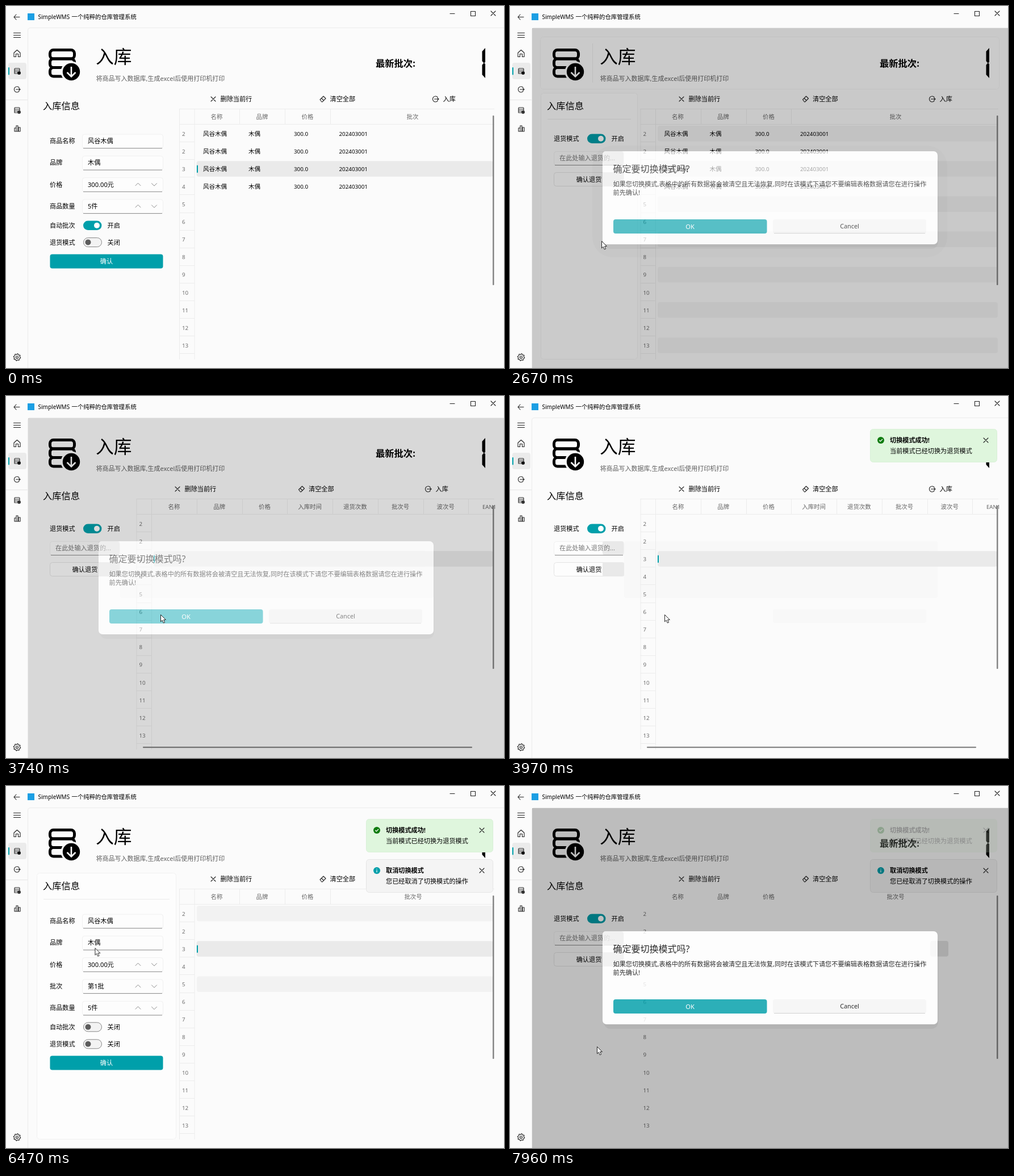
Animation of 877 by 638 pixels, one loop 8000 ms. Source, as an HTML page:

```html
<!DOCTYPE html>
<html lang="zh-CN">
<head>
<meta charset="utf-8">
<title>SimpleWMS</title>
<style>
html, body { margin: 0; width: 100%; height: 100%; overflow: hidden; background: #fbfbfb; }
svg { display: block; width: 877px; height: 638px; font-family: 'Noto Sans', 'Noto Sans CJK SC', 'Noto Sans CJK', sans-serif; }
.ic { fill: none; stroke: #222; stroke-width: 1.1; stroke-linecap: round; stroke-linejoin: round; }
.spin { stroke: #8c8c8c; stroke-width: 1; }
.entry, .entry2, .switching, .back, .again, .hover, .row1, .row5, .ghost { animation: 8s step-end infinite; }
.entry { animation-name: entry; }
.entry2 { animation-name: entry2; }
.switching { animation-name: switching; }
.back { animation-name: back; }
.again { animation-name: again; }
.hover { animation-name: hover; }
.row1 { animation-name: row1; }
.row5 { animation-name: row5; }
.ghost { animation-name: ghost; }
.ok { fill: #009faa; animation: ok 8s step-end infinite; }
.tip1 { animation: tip1 8s linear infinite; }
.tip2 { animation: tip2 8s linear infinite; }
.toast1 { animation: toast1 8s linear infinite; }
.toast2 { animation: toast2 8s linear infinite; }
.dialog { animation: dialog 8s linear infinite; }
.cursor { animation: cursor 8s linear infinite; }
@keyframes entry { 0% { opacity: 1 } 31.5%, 100% { opacity: 0 } }
@keyframes switching { 0% { opacity: 0 } 31.5% { opacity: 1 } 46.5%, 100% { opacity: 0 } }
@keyframes back { 0% { opacity: 0 } 46.5% { opacity: 1 } 77.5%, 100% { opacity: 0 } }
@keyframes entry2 { 0% { opacity: 0 } 77.5% { opacity: 1 } 96.5%, 100% { opacity: 0 } }
@keyframes again { 0% { opacity: 0 } 96.5%, 100% { opacity: 1 } }
@keyframes hover { 0% { opacity: 0 } 18.5%, 100% { opacity: 1 } }
@keyframes row5 { 0% { opacity: 0 } 56.5%, 100% { opacity: 1 } }
@keyframes row1 { 0% { opacity: 0 } 61.5%, 100% { opacity: 1 } }
@keyframes ghost { 0% { opacity: 1 } 56%, 100% { opacity: 0 } }
@keyframes ok { 0% { fill: #009faa } 39.5% { fill: #00a7b3 } 50%, 100% { fill: #009faa } }
@keyframes tip1 { 0%, 22.2% { opacity: 0 } 24%, 100% { opacity: 1 } }
@keyframes tip2 { 0%, 91.5% { opacity: 0 } 93.4%, 100% { opacity: 1 } }
@keyframes toast1 {
  0% { transform: translateX(245px) }
  47% { transform: translateX(245px); animation-timing-function: ease-out }
  49.6% { transform: none }
  97.5% { transform: none; opacity: 1 }
  100% { transform: none; opacity: .09 }
}
@keyframes toast2 {
  0% { transform: translateX(245px) }
  77.6% { transform: translateX(245px); animation-timing-function: ease-out }
  80.2%, 100% { transform: none }
}
@keyframes dialog {
  0%, 31.5% { opacity: 0 }
  34.375%, 45.9% { opacity: 1 }
  47.5%, 96.6% { opacity: 0 }
  99.5%, 100% { opacity: .83 }
}
@keyframes cursor {
  0%, 16.24% { transform: translate(405px, 640px) }
  16.25% { transform: translate(405px, 612px) }
  18% { transform: translate(330px, 535px) }
  20% { transform: translate(210px, 440px) }
  21.5%, 37.375% { transform: translate(161px, 414px) }
  38% { transform: translate(178px, 412px) }
  38.7% { transform: translate(196px, 409px) }
  39.4% { transform: translate(216px, 404px) }
  40.25%, 40.8% { transform: translate(251px, 387px) }
  42% { transform: translate(266px, 385px) }
  43.875%, 54.5% { transform: translate(272px, 385px) }
  56.5% { transform: translate(262px, 350px) }
  59% { transform: translate(300px, 280px) }
  61.5% { transform: translate(380px, 205px) }
  64.5%, 64.875% { transform: translate(440px, 171px) }
  66.5% { transform: translate(540px, 178px) }
  68.375%, 68.9% { transform: translate(622px, 206px) }
  70% { transform: translate(700px, 240px) }
  71.5% { transform: translate(560px, 298px) }
  73% { transform: translate(300px, 285px) }
  74.875%, 75.5% { transform: translate(120px, 240px) }
  76.5%, 78.5% { transform: translate(152px, 234px) }
  85.5%, 86.125% { transform: translate(165px, 384px) }
  88.5% { transform: translate(160px, 430px) }
  90.5%, 100% { transform: translate(153px, 459px) }
}
</style>
</head>
<body>
<svg id="stage" viewBox="0 0 877 638"></svg>
<script>
const TEAL = '#009faa', LINE = '#ececec', SIZE = 11.15;

// Text is placed by its vertical centre.
const text = (x, cy, str, { size = SIZE, fill = '#000', weight = 400, mid = false } = {}) =>
  `<text x="${x}" y="${cy + size * .37}" font-size="${size}" fill="${fill}" font-weight="${weight}"${mid ? ' text-anchor="middle"' : ''}>${str}</text>`;
const rect = (x, y, w, h, r, fill, more = '') =>
  `<rect x="${x}" y="${y}" width="${w}" height="${h}" rx="${r}" fill="${fill}" ${more}/>`;
const framed = (x, y, w, h, r, fill, stroke) =>
  rect(x + .5, y + .5, w - 1, h - 1, r, fill, `stroke="${stroke}"`);
const line = (x1, y1, x2, y2, color = LINE) =>
  `<path d="M${x1} ${y1}L${x2} ${y2}" stroke="${color}"/>`;
const icon = (x, y, d, cls = '') =>
  `<path class="ic ${cls}" transform="translate(${x} ${y})" d="${d}"/>`;
const disc = (x, y, r, fill) => `<circle cx="${x}" cy="${y}" r="${r}" fill="${fill}"/>`;
const group = (cls, ...parts) => `<g class="${cls}">${parts.join('')}</g>`;

const CROSS = 'M-4-4L4 4M4-4L-4 4';
const OUT = 'M3.6-3.4A5 5 0 1 0 3.6 3.4M-2 0H5.5M3.2-2.2L5.5 0L3.2 2.2';
const ERASER = 'M-5 1L1-5L5-1L-1 5H-2ZM-2.5-1.5L1.5 2.5';
const STACK = 'M-4-5H3Q4-5 4-4V-2H-5V-4Q-5-5-4-5ZM-5-2V1H1M4-2V0M-5 1V4H0';

function gearPath() {
  const points = [];
  for (let i = 0; i < 32; i++) {
    const r = i % 4 < 2 ? 6.2 : 4.8, a = (i + .5) * Math.PI / 16;
    points.push((r * Math.cos(a)).toFixed(1) + ' ' + (r * Math.sin(a)).toFixed(1));
  }
  return 'M' + points.join('L') + 'Z';
}

function frame() {
  return [
    rect(0, 0, 877, 638, 0, '#fbfbfb'),
    `<path d="M38.5 638V43Q38.5 38.5 43 38.5H877" fill="none" stroke="${LINE}"/>`,
    icon(19, 19.5, 'M5 0H-5M-1-4.5L-5 0L-1 4.5'),
    rect(38, 13, 12, 12, 0, '#1c9fe4'),
    text(56.5, 19, 'SimpleWMS', { size: 10 }),
    text(115.5, 19, '一个纯粹的仓库管理系统', { size: 10.4 }),
    icon(786, 13.5, 'M-4 0H4'), icon(822.5, 13.5, 'M-4-4H4V4H-4Z'), icon(858, 13, CROSS),
    icon(19.5, 51.5, 'M-6-4H6M-6 0H6M-6 4H6'),
    icon(19.5, 83.5, 'M-5.5-1L0-6L5.5-1V6H2V1H-2V6H-5.5Z'),
    rect(4, 100, 32, 29, 4, '#ebebeb'), rect(4, 108, 2, 13.5, 1, TEAL),
    icon(20, 115, STACK), disc(23, 118, 3, '#111'),
    icon(19.5, 147, OUT), line(0, 165.5, 38, 165.5, '#e6e6e6'),
    icon(20, 184, STACK), disc(23, 187, 3, '#333'),
    icon(20, 216, 'M-5 5V-1H-2V5ZM-2 5V-5H1V5ZM2 5V-2H5V5Z'),
    icon(19.5, 619, gearPath()), icon(19.5, 619, 'M-2 0A2 2 0 1 0 2 0A2 2 0 1 0-2 0')
  ].join('');
}

function heading() {
  return [77.5, 93, 108.5].map(y => rect(77.5, y, 43, 15.5, 6, 'none', 'stroke="#000" stroke-width="5"')).join('') +
    disc(115, 116, 18.5, '#fbfbfb') + disc(115, 116, 15.2, '#000') +
    '<path d="M115 107V124M107.5 117L115 124.5L122.5 117" fill="none" stroke="#fff" stroke-width="2.6"/>' +
    text(158, 89, '入库', { size: 31.8 }) +
    text(158.5, 128, '将商品写入数据库,生成excel后使用打印机打印', { size: 11, fill: '#5f5f5f' }) +
    text(651, 101, '最新批次:', { size: 16.3, weight: 700 }) +
    '<path d="M844 74V99L841.5 101L838.5 97V80ZM844 127V102L841.5 100L838.5 104V121Z"/>';
}

const formTitle = () => text(65, 176, '入库信息', { size: 16.3, weight: 500 });
const card = w => framed(54, 153, w, 470, 5, '#fdfdfd', '#f1f1f1') + line(66, 199.5, 42 + w, 199.5, '#ebebeb');

function field(cy, label, value, spin) {
  const y = cy - 12.5;
  return text(77, cy, label) + framed(134, y, 143, 26, 4, '#fdfdfd', '#f0f0f0') +
    `<path d="M136 ${y + 25.2}H275" stroke="#8a8a8a"/>` + text(144, cy, value) +
    (spin ? icon(232.5, cy, 'M-4.5 2L0-2.5L4.5 2', 'spin') + icon(261, cy, 'M-4.5-2L0 2.5L4.5-2', 'spin') : '');
}

function toggle(cy, label, on) {
  return text(77, cy, label) + (on
    ? rect(136, cy - 8.5, 32.5, 16.5, 8.25, TEAL) + disc(160, cy - .25, 5, '#fff')
    : framed(136, cy - 9, 33, 17, 8, '#f3f3f3', '#858585') + disc(144.5, cy - .6, 5, '#5c5c5c')) +
    text(178.5, cy, on ? '开启' : '关闭');
}

const confirm = y => rect(77.5, y + .5, 199, 25, 4, TEAL) + text(177, y + 13, '确认', { fill: '#fff', mid: true });

function tip(cls, x, y) {
  return group(cls,
    rect(x - 1, y + 1, 160, 28, 6, 'rgba(0,0,0,.05)'), rect(x, y + 2, 158, 25, 5, 'rgba(0,0,0,.08)'),
    framed(x, y, 158, 25, 4, '#f7f7f7', '#dcdcdc'),
    text(x + 7, y + 12.5, '使用该选项会进入特殊的退货模式', { size: 9.6 }));
}

function returnForm() {
  return formTitle() + toggle(234, '退货模式', true) +
    framed(77, 256, 124, 25, 4, '#fdfdfd', '#f0f0f0') + line(79, 280.5, 199, 280.5, '#8a8a8a') +
    framed(77, 293, 124, 25, 4, '#fdfdfd', '#e4e4e4') +
    rect(163, 256, 37, 24, 3, '#e9e9e9') + rect(163, 293, 38, 25, 3, '#e9e9e9') +
    text(87, 268, '在此处输入退货的...', { fill: '#777' }) +
    text(139, 305.5, '确认退货', { mid: true });
}

const tools = (a, b, c) =>
  icon(a, 164, CROSS) + text(a + 12.5, 164, '删除当前行') +
  icon(b, 164, ERASER) + text(b + 12.5, 164, '清空全部') +
  icon(c, 164, OUT) + text(c + 13, 164, '入库');

const rowY = i => 211 + 31.1 * i;
const stripe = (x, i, fill = '#f2f2f2', w = 859 - x) => rect(x, rowY(i), w, 27.5, 4, fill);

// x: left edge; cols: column dividers; heads: [centre, label] pairs
function table(x, cols, heads, { grid = true, picked = true } = {}) {
  const edge = 860;
  let out = '';
  if (grid) {
    out += line(x, 181.5, edge, 181.5) + line(x, 208.5, edge, 208.5) +
      line(x + .5, 181, x + .5, 623) + line(x + 27, 181, x + 27, 623);
    for (const c of cols) out += line(c + .5, 181, c + .5, 208);
    for (let i = 1; i < 14; i++) {
      const y = Math.round(208 + 31.1 * i) + .5;
      out += line(x, y, x + 27, y);
    }
  }
  if (picked) out += stripe(x + 30.5, 2, '#eaeaea', 858 - x - 30.5) + rect(Math.round(x + 30.5), 280.5, 2, 13.5, 1, TEAL);
  for (let i = 0; i < 13; i++)
    out += text(x + 5, 225 + 31.1 * i, Math.max(2, i + 1), { size: 9.8, fill: '#6e6e6e' });
  for (const [c, label] of heads) out += text(c, 195, label, { size: 10.4, fill: '#666', mid: true });
  return out;
}

function stock(x) {
  let out = '';
  for (let i = 0; i < 4; i++) {
    const y = 225 + 31.1 * i;
    out += text(x + 42, y, '风谷木偶', { size: 10.5 }) + text(x + 122, y, '木偶', { size: 10.5 }) +
      text(x + 202, y, '300.0', { size: 9.8 }) + text(x + 281.5, y, '202403001', { size: 9.8 });
  }
  return out;
}

const vbar = h => rect(857, 193, 2.5, h, 1, '#858585');
const heads = (x, last, label) => [[x + 66, '名称'], [x + 146, '品牌'], [x + 226, '价格'], [last, label]];

function entryForm(batch) {
  const rows = [['商品名称', '风谷木偶'], ['品牌', '木偶'], ['价格', '300.00元', 1]];
  if (batch) rows.push(['批次', '第1批', 1]);
  rows.push(['商品数量', '5件', 1]);
  const shift = batch ? 38.3 : 0;
  return formTitle() + rows.map((r, i) => field(238 + 38.3 * i, ...r)).join('') +
    toggle(387 + shift, '自动批次', !batch) + toggle(417 + shift, '退货模式', false) +
    confirm(437 + Math.round(shift));
}

function toast(cls, y, fill, stroke, mark, title, body) {
  return group(cls, framed(634, y, 224, 59, 5, fill, stroke), mark,
    text(669, y + 20, title, { weight: 700 }), text(669, y + 39, body), icon(838, y + 20, CROSS));
}

function dialog() {
  return group('dialog',
    rect(39, 39, 838, 599, 0, 'rgba(0,0,0,.3)'),
    group('switching', rect(145, 246, 625, 197, 36, 'rgba(0,0,0,.04)')),
    rect(165, 262, 589, 166, 12, 'rgba(0,0,0,.07)'),
    rect(163, 256, 590, 164, 7, '#fdfdfd'),
    rect(163, 256, 37, 24, 5, '#f3f3f3'), rect(163, 293, 37, 25, 0, '#f5f5f5'),
    text(181.5, 287, '确定要切换模式吗?', { size: 16 }),
    text(181.5, 314, '如果您切换模式,表格中的所有数据将会被清空且无法恢复,同时在该模式下请您不要编辑表格数据请您在进行操作'),
    text(181.5, 329, '前先确认!'),
    '<rect class="ok" x="182" y="376" width="270.5" height="25" rx="4"/>',
    text(317, 388.5, 'OK', { fill: '#fff', mid: true }),
    rect(463, 376, 270, 25, 4, '#f5f5f5'), line(465, 400.6, 731, 400.6, '#c8c8c8'),
    text(598, 388.5, 'Cancel', { size: 10.8, mid: true }));
}

const backCols = [], backHeads = [];
['名称', '品牌', '价格', '入库时间', '退货次数', '批次号', '波次号'].forEach((label, i) => {
  backCols.push(Math.round(336 + 79.7 * i));
  backHeads.push([296 + 79.7 * i, label]);
});

const evens = [0, 2, 4, 6, 8, 10, 12].map(i => stripe(260, i)).join('');

document.getElementById('stage').innerHTML = [
  frame(),
  group('switching', framed(53, 54, 809, 93, 5, '#fcfcfc', '#f2f2f2'), line(145.5, 66, 145.5, 135)),
  heading(),

  group('entry',
    group('hover', card(246), stripe(336, 12, '#f6f6f6', 523)),
    entryForm(false), tools(365, 558, 756.5),
    table(305, [411, 491, 571], heads(305, 716, '批次')), stock(305), vbar(299),
    tip('tip1', 126, 374)),

  group('switching',
    card(171), returnForm(), tools(302, 520.5, 743.5), evens,
    table(229.5, [336, 416, 495], heads(229.5, 679, '批次'), { picked: false }), stock(229.5), vbar(299)),

  group('back',
    returnForm(), tools(302, 520.5, 743.5),
    rect(201, 256, 552, 100, 4, '#f8f8f8'),
    group('ghost', rect(463, 376, 270, 24, 4, '#f8f8f8')),
    group('row1', stripe(260, 0)), group('row5', stripe(260, 4)),
    table(229.5, backCols, backHeads),
    text(839, 195, 'EAN1', { size: 9.6, fill: '#666' }), vbar(288),
    rect(241, 618, 580, 2.3, 1, '#858585')),

  group('entry2',
    card(246), entryForm(true), tools(365, 558, 756.5),
    stripe(336, 0), stripe(336, 4),
    table(305, [411, 491, 571], heads(305, 717, '批次号')), vbar(288),
    tip('tip2', 88, 412)),

  group('again',
    returnForm(), tools(302, 520.5, 743.5),
    table(229.5, [], heads(229.5, 679, '批次号'), { grid: false, picked: false }), vbar(288),
    rect(740, 273, 32, 27.5, 4, '#e2e2e2')),

  toast('toast1', 58, '#dff6dd', '#d9f0d7',
    disc(653, 78, 6, '#107c10') + '<path d="M650.3 78L652.3 80L656 76" fill="none" stroke="#fff" stroke-width="1.2"/>',
    '切换模式成功!', '当前模式已经切换为退货模式'),
  toast('toast2', 129, '#f4f4f4', '#e5e5e5',
    disc(653, 149, 6, TEAL) + '<path d="M653 145.8V147M653 148.3V152.3" stroke="#fff" stroke-width="1.2"/>',
    '取消切换模式', '您已经取消了切换模式的操作'),

  dialog(),
  '<path class="cursor" d="M.5 .5V12.8L3.3 10.2L5.3 15L7.6 14L5.6 9.4H9.4Z" fill="#fff" stroke="#111" stroke-width=".9"/>'
].join('');
</script>
</body>
</html>
```
